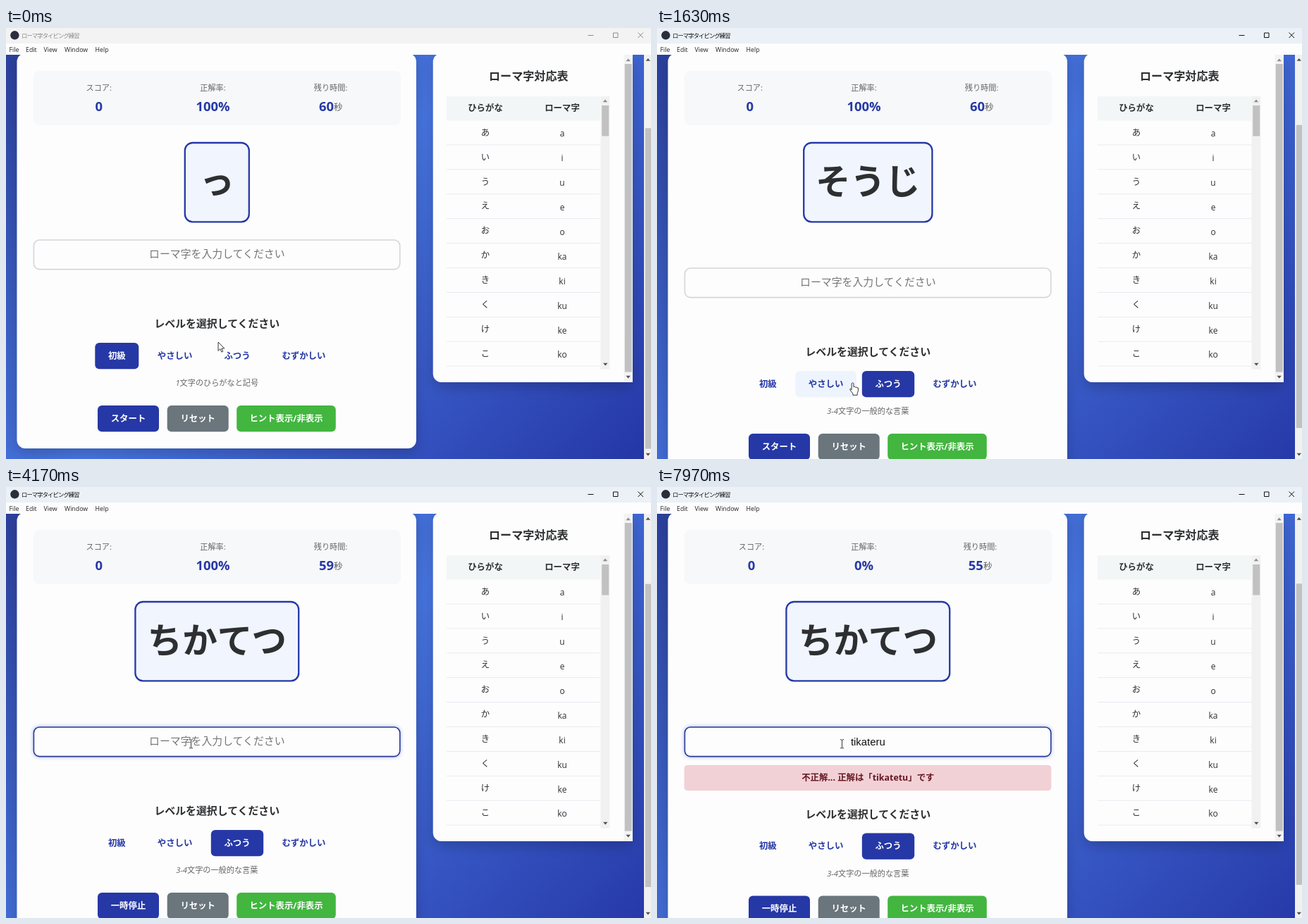
Write an HTML page that moves like this. It is 915x612 px and loops after 8000 ms.

```html
<!DOCTYPE html>
<html lang="ja">
<head>
<meta charset="utf-8">
<title>ローマ字タイピング練習</title>
<style>
html, body { margin: 0; width: 100%; height: 100%; overflow: hidden; background: #fdfdfd; }
svg { display: block; width: 915px; height: 612px; }
text { font-family: 'Open Sans', 'Noto Sans CJK JP', 'Noto Sans CJK', sans-serif; white-space: pre; }
.mid { text-anchor: middle; }
.bold { font-weight: 700; }
.typed { font-family: 'Liberation Sans', Arial, sans-serif; }
</style>
</head>
<body>
<svg id="stage" viewBox="0 0 915 612" xmlns="http://www.w3.org/2000/svg"></svg>
<script>
const LOOP = 8000;
const BLUE = '#2638a6', INK = '#2d2f31', GREY = '#666';
const ACTIVATE = 900, PICK = 1250, START = 2450, JUDGE = 7700;
const MID = 299.3;

const rect = (x, y, w, h, fill, r = 0, more = '') =>
  `<rect x="${x}" y="${y}" width="${w}" height="${h}" rx="${r}" fill="${fill}" ${more}/>`;
const text = (x, y, size, fill, str, cls = 'mid', more = '') =>
  `<text x="${x}" y="${y}" font-size="${size}" fill="${fill}" class="${cls}" ${more}>${str}</text>`;
const tri = (x, y, dir, fill = '#505050') =>
  `<path d="M${x - 3.2} ${y + 1.7 * dir}h6.4l-3.2 ${-3.6 * dir}z" fill="${fill}"/>`;

const levels = [
  { name: '初級', x: 126.3, w: 62 },
  { name: 'やさしい', x: 196.2, w: 86.8 },
  { name: 'ふつう', x: 290.8, w: 74.4 },
  { name: 'むずかしい', x: 372.8, w: 99.2 }
];
const actions = [
  { name: 'スタート', x: 130, w: 87, fill: BLUE, hover: '#24347f' },
  { name: 'リセット', x: 228.7, w: 87, fill: '#6a757c', hover: '#596268' },
  { name: 'ヒント表示/非表示', x: 327.2, w: 140.6, fill: '#42b63f', hover: '#389c36' }
];

function table() {
  const kana = [...'あいうえおかきくけこ'];
  const romaji = 'a i u e o ka ki ku ke ko'.split(' ');
  let out = rect(625, 97, 218.5, 34.5, '#f3f6f7') +
    text(680, 117.6, 12.4, INK, 'ひらがな', 'mid bold') +
    text(789, 117.6, 12.4, INK, 'ローマ字', 'mid bold');
  kana.forEach((k, i) => {
    const y = 148 + i * 34.9;
    out += text(680, y + 4.7, 12.4, INK, k) + text(789, y + 6.3, 12, INK, romaji[i]) +
      rect(625, y + 17.6, 218.5, 0.8, '#e3e7f0');
  });
  return out;
}

const stage = document.getElementById('stage');
stage.innerHTML = `
<defs>
  <linearGradient id="sky" gradientUnits="userSpaceOnUse">
    <stop offset="0" stop-color="#26368f"/><stop offset=".5" stop-color="#4776e2"/><stop offset="1" stop-color="#2536a5"/>
  </linearGradient>
  <filter id="shade" x="-10%" y="-10%" width="120%" height="120%">
    <feDropShadow dx="0" dy="7" stdDeviation="10" flood-color="#000" flood-opacity=".2"/>
  </filter>
  <filter id="glow" x="-5%" y="-40%" width="110%" height="180%"><feGaussianBlur stdDeviation="2.5"/></filter>
</defs>
${rect(0, 0, 915, 612, 'url(#sky)')}
${rect(15.5, 36, 566.5, 561, '#fdfdfd', 12, 'id="card" filter="url(#shade)"')}
${rect(39, 61, 521, 77, '#f6f8f9', 8)}
<g id="score">${text(0, 89.2, 11.16, GREY, 'スコア:')}${text(0, 118.4, 18.4, BLUE, '0', 'mid bold')}</g>
${text(293.5, 89.2, 11.16, GREY, '正解率:')}
${text(293.5, 118.4, 18.4, BLUE, '', 'mid bold', 'id="rate"')}
<g id="time">${text(0, 89.2, 11.16, GREY, '残り時間:')}
${text(-16.7, 118.4, 18.4, BLUE, '', 'bold', 'id="secs"')}${text(4.4, 117, 12.4, '#555', '秒', '')}</g>
${rect(0, 163, 0, 112.3, '#f0f5fe', 11, `id="tile" stroke="${BLUE}" stroke-width="2.3"`)}
${text(MID, 236, 49.6, INK, '', 'mid bold', 'id="word"')}
<g id="field">
  ${rect(38, 299.5, 522, 44.5, '#5b7bd8', 9, 'id="halo" opacity=".45" filter="url(#glow)"')}
  ${rect(39.4, 301, 519.4, 41.6, '#fdfdfd', 8, 'id="box" stroke-width="1.6"')}
  ${text(MID, 326.2, 14.88, '#757575', 'ローマ字を入力してください', 'mid', 'id="hint"')}
  ${text(MID, 326.6, 14.88, '#111', '', 'mid typed', 'id="typed"')}
  ${rect(0, 313.5, 1, 16, '#111', 0, 'id="caret"')}
</g>
<g id="alert">${rect(39.2, 395.4, 519.6, 35.2, '#f2d1d6', 4, 'stroke="#efc6cc" stroke-width=".8"')}
${text(MID, 417, 12.4, '#651822', '不正解... 正解は「tikatetu」です', 'mid bold')}</g>
<g id="lower">
  ${text(MID, 425.2, 14.88, INK, 'レベルを選択してください', 'mid bold')}
  ${levels.map((b, i) => rect(b.x, 447, b.w, 37.2, 'none', 6, `id="lv${i}"`) +
    text(b.x + b.w / 2, 469.8, 12.4, BLUE, b.name, 'mid bold', `id="lt${i}"`)).join('')}
  ${text(MID, 508.4, 11.16, GREY, '', 'mid', 'id="about"')}
  ${actions.map((b, i) => `<g id="act${i}">${rect(b.x, 536, b.w, 37.2, b.fill, 6, `id="ab${i}"`)}` +
    text(b.x + b.w / 2, 558.5, 12.4, '#fff', b.name, 'mid bold', `id="at${i}"`) + '</g>').join('')}
</g>
${rect(605.8, 36, 283, 467, '#fdfdfd', 12, 'filter="url(#shade)"')}
${text(741.3, 74.2, 16.1, INK, 'ローマ字対応表', 'mid bold')}
${table()}
${rect(843.5, 97, 12.8, 387.5, '#f1f1f1')}${rect(845.2, 110, 10, 43.5, '#c1c1c1')}
${tri(850, 103.5, 1, '#8a8a8a')}${tri(850.3, 477.5, -1)}
${rect(876.5, 36, 12.5, 467, '#f3f3f3')}${rect(877.8, 51, 10, 437.5, '#c1c1c1')}
${tri(882.7, 45.5, 1, '#8a8a8a')}${tri(882.7, 495.5, -1)}
${rect(905, 36, 10, 576, '#f1f1f1')}${rect(906.8, 0, 8.2, 0, '#c1c1c1', 0, 'id="thumb"')}
${tri(910.8, 45, 1)}${tri(910.8, 605.5, -1)}
${rect(0, 0, 915, 22, '#f3f3f3', 0, 'id="bar"')}${rect(0, 22, 915, 16, '#fdfdfd')}
<circle cx="12.4" cy="10.3" r="6.2" fill="#2b2e3b"/>
<g id="caption" stroke-width="1">
  ${text(22, 13.6, 8.4, 'inherit', 'ローマ字タイピング練習', '', 'letter-spacing="-.95" stroke="none"')}
  <path d="M825.5 10.5h8M861.5 7h6.5v6.5h-6.5zM896.5 6.5l7.5 7.5m0-7.5l-7.5 7.5" style="fill:none"/>
</g>
${[['File', 4.5], ['Edit', 28], ['View', 53.5], ['Window', 83], ['Help', 126.5]]
  .map(([s, x]) => text(x, 34, 8.8, '#222', s, '')).join('')}
<g stroke="#222" stroke-width=".9" fill="#fff" stroke-linejoin="round">
  <path id="arrow" d="M0 0v12.4l2.9-2.7 1.9 4.4 1.9-.8-1.9-4.3h4z"/>
  <path id="hand" d="M-1.4 1.2q1.4-2 2.8 0v5l1.6-.4 1 .9 1.5-.3.9 1 1.4.1q.7 4.6-1.2 7.7v2.6h-6.2v-2.2q-2.8-3-4.4-6.3.9-1.6 2.6.9z"/>
  <path id="beam" d="M-2.6-6h2l.6.6.6-.6h2M0-5.4v10.8M-2.6 6h2l.6-.6.6.6h2" fill="none"/>
</g>`;

const el = {};
stage.querySelectorAll('[id]').forEach(n => el[n.id] = n);
const set = (id, attrs) => { for (const k in attrs) el[id].setAttribute(k, attrs[k]); };
const show = (id, on) => { el[id].style.display = on ? '' : 'none'; };
const say = (id, str) => { if (el[id].textContent !== str) el[id].textContent = str; };
const move = (id, x, y) => set(id, { transform: `translate(${x} ${y})` });

// time, x, y of the pointer
const path = [
  [0, 301, 446], [250, 301, 446], [800, 321, 462], [1400, 321, 462],
  [2000, 189.5, 587.5], [2480, 189.5, 587.5], [2770, 241, 421], [3250, 262.5, 364.8]
];
const keys = [5650, 5850, 6100, 6350, 6720, 6920, 7150, 7400];

function pointer(t) {
  const i = path.findIndex(p => p[0] > t);
  if (i < 0) return path[path.length - 1].slice(1);
  const a = path[i - 1], b = path[i];
  const u = (t - a[0]) / (b[0] - a[0]), e = u * u * (3 - 2 * u);
  return [a[1] + (b[1] - a[1]) * e, a[2] + (b[2] - a[2]) * e];
}

let lastAbout = '';

function draw(t) {
  const picked = t >= PICK, running = t >= START, wrong = t >= JUDGE;
  const drop = picked ? 40 : 0, low = drop + (wrong ? 4.5 : 0);
  const [px, py] = pointer(t);
  const over = (b, y) => px >= b.x && px <= b.x + b.w && py >= y + low && py <= y + low + 37.2;

  // page
  const pageH = 691 + low, q = (905 + pageH) / 4, cy = -79 + pageH / 2;
  const sky = document.getElementById('sky');
  [['x1', 452.5 - q], ['y1', cy - q], ['x2', 452.5 + q], ['y2', cy + q]].forEach(([k, v]) => sky.setAttribute(k, v));
  set('card', { height: 561 + low });
  set('thumb', { y: 50 + 117 / pageH * 548 - (picked ? 0 : 0.5), height: 574 / pageH * 548 });
  set('bar', { fill: picked ? '#ebf1f7' : '#f3f3f3' });
  const cap = t >= ACTIVATE ? '#111' : '#8c8c8c';
  set('caption', { fill: cap, stroke: cap });

  // figures
  move('score', wrong ? 134 : 131.7, 0);
  move('time', wrong ? 458.5 : 460.6, 0);
  say('rate', wrong ? '0%' : '100%');
  say('secs', String(60 - (running ? Math.floor((t - START) / 1000) : 0)));

  // word tile
  const word = running ? 'ちかてつ' : picked ? 'そうじ' : 'っ';
  const w = Math.max(91, word.length * 49.6 + 33.4);
  set('tile', { x: MID - w / 2, width: w });
  say('word', word);

  // input
  const typed = 'tikateru'.slice(0, keys.filter(k => k <= t).length);
  move('field', 0, drop);
  show('halo', running);
  set('box', { stroke: running ? '#2a3a96' : '#d3d6da' });
  show('hint', !typed);
  say('typed', typed);
  const since = t - (typed ? keys[typed.length - 1] : START);
  show('caret', running && since % 1000 < 500);
  set('caret', { x: MID + (typed ? el.typed.getComputedTextLength() / 2 : 0) });
  show('alert', wrong);

  // levels and buttons
  move('lower', 0, low);
  let shape = 'arrow';
  levels.forEach((b, i) => {
    const on = i === (picked ? 2 : 0), hot = over(b, 447);
    if (hot) shape = 'hand';
    set('lv' + i, { fill: on ? BLUE : hot ? '#eef4fd' : 'none' });
    set('lt' + i, { fill: on ? '#fff' : BLUE });
  });
  const about = picked ? ['3-4', '文字の一般的な言葉'] : ['1', '文字のひらがなと記号'];
  if (about[0] !== lastAbout) {
    lastAbout = about[0];
    el.about.innerHTML = `<tspan font-style="italic">${about[0]}</tspan>${about[1]}`;
  }
  actions.forEach((b, i) => {
    const hot = over(b, 536);
    if (hot) shape = 'hand';
    set('ab' + i, { fill: hot ? b.hover : b.fill });
    move('act' + i, 0, hot ? -1.5 : 0);
  });
  say('at0', running ? '一時停止' : 'スタート');

  // pointer
  if (px > 39 && px < 559 && py > 300 + drop && py < 343 + drop) shape = 'beam';
  ['arrow', 'hand', 'beam'].forEach(id => { show(id, id === shape); move(id, px, py); });
}

const origin = performance.now();
function tick() {
  draw((performance.now() - origin) % LOOP);
  requestAnimationFrame(tick);
}
tick();
</script>
</body>
</html>
```
